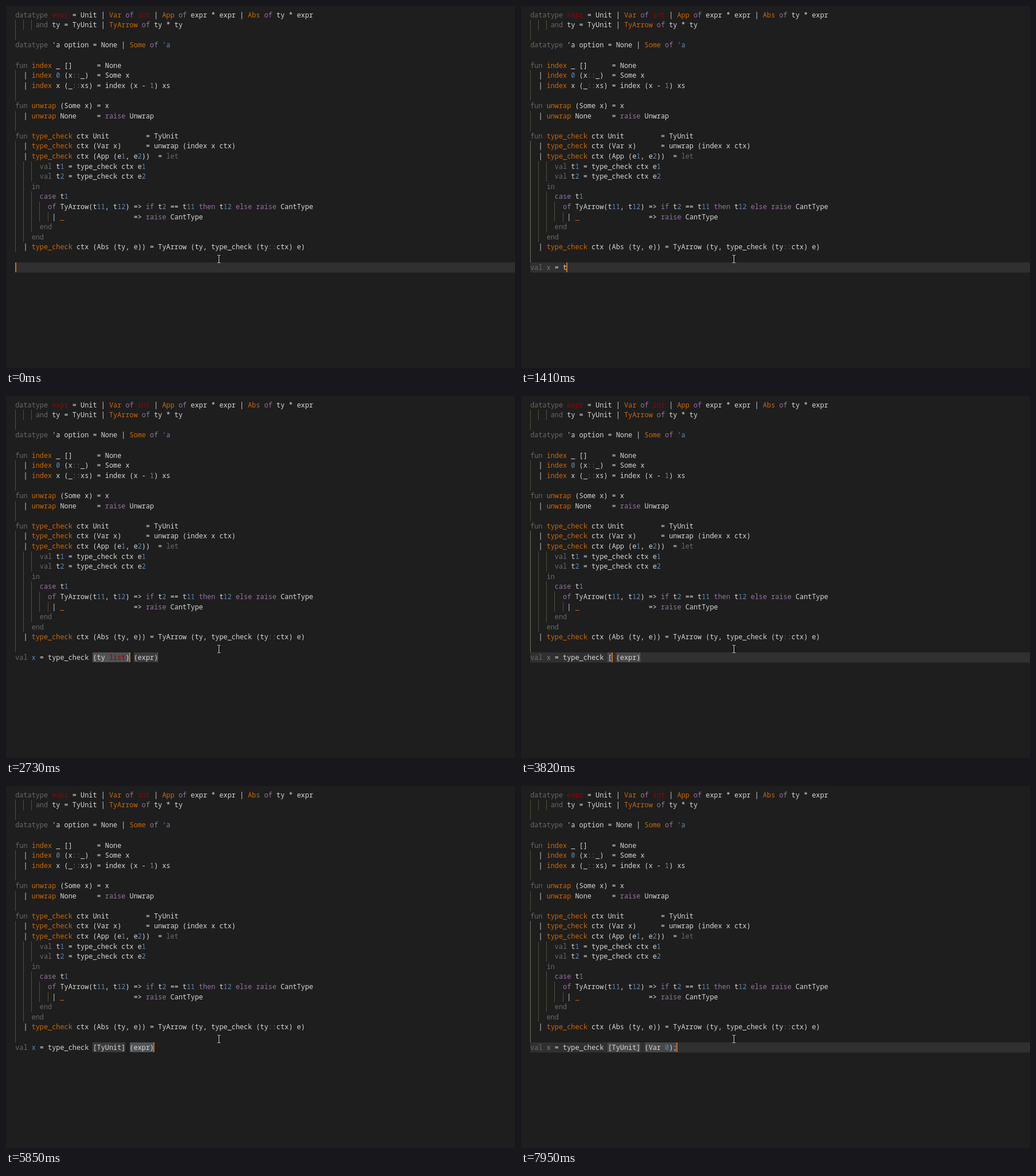
Animation, 888 px wide and 631 px high, one loop 8000 ms. Source, as an HTML page with a canvas:

```html
<!DOCTYPE html>
<html lang="en">
<head>
<meta charset="utf-8">
<title>Typing in an editor</title>
<style>
html, body { margin: 0; width: 100%; height: 100%; overflow: hidden; background: #1e1e1e; }
canvas { display: block; }
</style>
</head>
<body>
<canvas id="stage" width="888" height="631"></canvas>
<script>
const ctx = document.getElementById('stage').getContext('2d');
const LOOP = 8000;
const LEFT = 16.15, TOP = 7, CHAR = 7.12, ROW = 17.6, INPUT_ROW = 25;
const FONT = `${CHAR / 0.6}px "Noto Sans Mono", "DejaVu Sans Mono", monospace`;
const INK = {
  text: '#d6d8d5', k: '#676867', f: '#ce6700', p: '#9872a2',
  n: '#6089b4', r: '#9b0000', d: '#77777d'
};

// {xword} paints word in the ink named x.
const CODE = `{kdatatype} {rexpr} = Unit | {fVar} {pof} {rint} | {fApp} {pof} expr * expr | {fAbs} {pof} ty * expr
     {kand} ty = TyUnit | {fTyArrow} {pof} ty * ty

{kdatatype} 'a option = None | {fSome} {pof} {n'a}

{kfun} {findex} _ []      = None
  | {findex} {n0} (x{k::}_)  = Some x
  | {findex} x (_{k::}xs) = index (x - {n1}) xs

{kfun} {funwrap} (Some x) = x
  | {funwrap} None     = {praise} Unwrap

{kfun} {ftype_check} ctx Unit         = TyUnit
  | {ftype_check} ctx (Var x)      = unwrap (index x ctx)
  | {ftype_check} ctx (App (e{n1}, e{n2}))  = {klet}
      {kval} t{n1} = type_check ctx e{n1}
      {kval} t{n2} = type_check ctx e{n2}
    {kin}
      {pcase} t{n1}
        {pof} TyArrow(t{n11}, t{n12}) => {pif} t{n2} == t{n11} {pthen} t{n12} {pelse} {praise} CantType
         | {f_}                 => {praise} CantType
      {kend}
    {kend}
  | {ftype_check} ctx (Abs (ty, e)) = TyArrow (ty, type_check (ty{k::}ctx) e)`.split('\n');

const VAL = '{kval} ';
const BIND = VAL + '{dx} = ';
const CALL = VAL + '{nx} = type_check ';
const first = s => ({ line: `${CALL}${s} (expr)`, caret: 19 + s.length, snippet: true });
const second = (s, n) => ({ line: `${CALL}[TyUnit] ${s}`, caret: 28 + n, snippet: true });
const type = (line, caret, popup) => ({ line, caret, popup });
const hide = state => ({ ...state, blink: true });

const LIST_V = { x: -14, items: ['val', 'Var'], doc: 'val' };
const LIST_TY = { x: 43, items: ['type_check', 'ty', 'TyUnit', 'TyArrow'], doc: 'ty list -> expr -> ty' };
const LIST_TYP = { ...LIST_TY, items: ['type_check'] };

const typed = type(BIND + 'typ', 11, LIST_TYP);
const pickFirst = { ...first('(ty {rlist})'), caret: 28, selected: 1 };
const pickSecond = { ...second('(expr)', 6), selected: 2 };
const varTyped = second('(Var ', 5);

const STEPS = [
  [0, type('', 0)],
  [160, type('v', 1)],
  [240, type('va', 2, LIST_V)],
  [320, type('{kval}', 3, LIST_V)],
  [400, type(VAL, 4)],
  [710, type(VAL + '{dx}', 5)],
  [870, type(VAL + '{dx} ', 6)],
  [1040, type(VAL + '{dx} =', 7)],
  [1250, type(BIND, 8)],
  [1410, type(BIND + 't', 9)],
  [1490, type(BIND + 'ty', 10)],
  [1570, type(BIND + 'ty', 10, LIST_TY)],
  [1720, typed],
  [2270, hide(typed)],
  [2730, pickFirst],
  [3280, hide(pickFirst)],
  [3740, pickFirst],
  [3820, first('[')],
  [4050, first('[T')],
  [4210, first('[Ty')],
  [4370, first('[TyU')],
  [4530, first('[TyUn')],
  [5070, hide(first('[TyUn'))],
  [5390, first('[TyUni')],
  [5540, first('[TyUnit')],
  [5690, first('[TyUnit]')],
  [5850, pickSecond],
  [6310, hide(pickSecond)],
  [6480, second('(', 1)],
  [6600, second('(V', 2)],
  [6710, second('(Va', 3)],
  [6830, second('(Var', 4)],
  [6940, varTyped],
  [7410, hide(varTyped)],
  [7600, second('(Var {n0}', 6)],
  [7770, second('(Var {n0})', 7)],
  [7950, second('(Var {n0});', 8)]
];

const colX = col => LEFT + col * CHAR;
const rowY = row => Math.floor(TOP + row * ROW);
const plain = line => line.replace(/\{\w([^}]*)\}/g, '$1');

function rect(color, x, y, w, h) {
  ctx.fillStyle = color;
  ctx.fillRect(x, y, w, h);
}

function chars(text, x, y, color) {
  ctx.fillStyle = color;
  [...text].forEach((c, i) => { if (c !== ' ') ctx.fillText(c, x + i * CHAR, y); });
}

function drawLine(line, row) {
  const y = Math.round(TOP + row * ROW + 12.6);
  let col = 0;
  for (const [all, ink, word] of line.matchAll(/\{(\w)([^}]*)\}|[^{]+/g)) {
    const text = word || all;
    chars(text, colX(col), y, INK[ink || 'text']);
    col += text.length;
  }
}

function drawGuides(active) {
  const guide = (col, row, color) =>
    rect(color, Math.floor(colX(col)), rowY(row), 1, rowY(row + 1) - rowY(row));
  CODE.forEach((line, row) => {
    const indent = line ? line.search(/\S/) : row === 4 ? 0 : 1;
    for (let col = 0; col < indent; col += 2) {
      guide(col, row, active && col === 0 && row > 12 ? '#707057' : '#505037');
    }
  });
}

function drawSnippet(state) {
  const text = plain(state.line);
  const split = text.lastIndexOf(' (');
  const y = rowY(INPUT_ROW);
  [[19, split], [split + 1, text.length]].forEach(([from, to], i) => {
    const x = Math.round(colX(from)), w = Math.round(colX(to)) - x;
    rect('rgba(124,124,124,0.3)', x, y, w, 17);
    if (state.selected === i + 1) rect('rgba(103,107,113,0.5)', x, y, w, 17);
  });
  rect('#626262', Math.floor(colX(text.length)) - 1, y, 1, 17);
}

function drawPopup({ x, items, doc }) {
  const y = 465, listW = 332, height = Math.max(19, Math.round(items.length * ROW));
  const panel = (px, w, h) => {
    rect('#454545', px, y, w, h);
    rect('#272727', px + 1, y + 1, w - 2, h - 2);
  };
  ctx.save();
  ctx.beginPath();
  ctx.rect(16, y, 872, 80);
  ctx.clip();
  panel(x, listW, height);
  panel(x + listW - 1, 332, 56);
  rect('#4a4a4a', x + 1, y + 1, listW - 2, 17);
  items.forEach((item, i) => chars(item, x + 30, Math.round(y + 12.6 + i * ROW), INK.text));
  chars(doc, x + listW + 8, y + 17, INK.text);
  ctx.restore();
}

function drawMouse() {
  rect('#111', 370, 435, 3, 12);
  rect('#e8e8e8', 371, 435, 1, 12);
  for (const y of [434, 447]) {
    rect('#e8e8e8', 369, y, 2, 1);
    rect('#e8e8e8', 372, y, 2, 1);
  }
}

function draw(state) {
  const y = rowY(INPUT_ROW);
  rect('#1e1e1e', 0, 0, 888, 631);
  ctx.font = FONT;
  if (!state.selected) rect('#303030', 16, y, 872, ROW);
  drawGuides(state.line && !state.selected);
  if (state.line) {
    rect(state.selected ? '#505037' : '#707057', 16, rowY(24), 1, y - rowY(24));
  }
  if (state.snippet) drawSnippet(state);
  CODE.forEach(drawLine);
  drawLine(state.line, INPUT_ROW);
  if (state.popup) drawPopup(state.popup);
  if (!state.blink) {
    const x = Math.round(colX(state.caret)) - (state.caret ? 1 : 0);
    rect('#c07020', x, y, 2, 17);
  }
  drawMouse();
}

const start = performance.now();
function tick() {
  const t = (performance.now() - start) % LOOP;
  draw(STEPS.findLast(([at]) => at <= t)[1]);
  requestAnimationFrame(tick);
}
tick();
</script>
</body>
</html>
```
